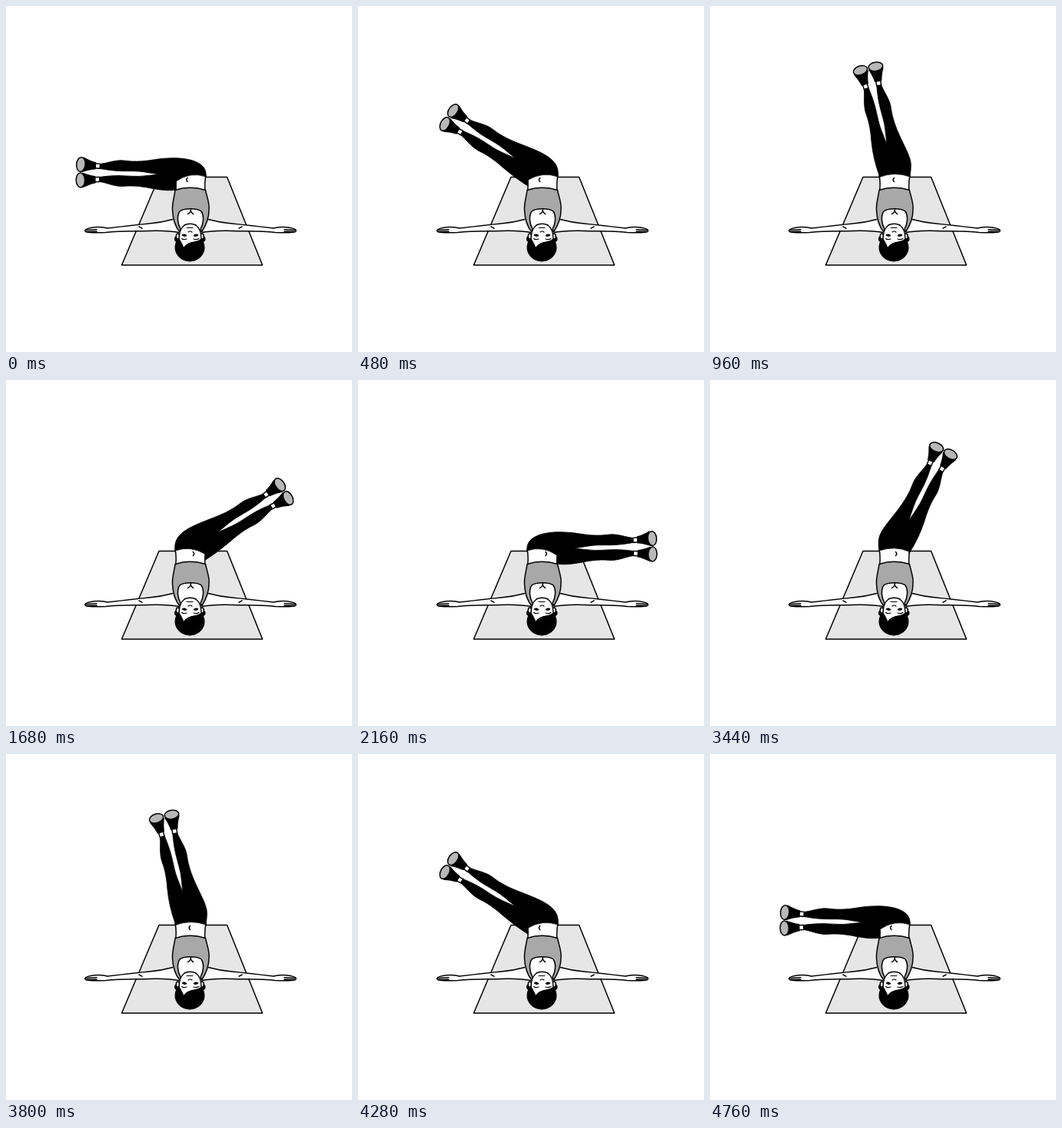
Write an HTML page that moves like this. It is 450 px wide and 450 px high and loops after 5200 ms.

```html
<!DOCTYPE html>
<html lang="en">
<head>
<meta charset="utf-8">
<title>Lying leg swing</title>
<style>
  html, body { margin: 0; width: 100%; height: 100%; overflow: hidden; background: #fff; }
  svg { display: block; width: 100vw; height: 100vh; }
  .line { fill: none; stroke: #000; stroke-width: 1.5; stroke-linecap: round; stroke-linejoin: round; }
  .skin { fill: #fff; }
  .mat { fill: #e6e6e6; }
  .top { fill: #a8a8a8; }
  .sole { fill: #b8b8b8; }
  .ink { fill: #000; }
  .thin { stroke-width: 1.2; }
  .pants { stroke: #000; stroke-width: .8; stroke-linejoin: round; }
</style>
</head>
<body>
<svg viewBox="0 0 450 450">
  <defs>
    <g id="arm">
      <path class="line skin" d="M217 277.500C208 280 197 282 186 283C166 285 149 287 132 289C126 287 116 287 110 288.500C105 289.500 102 291 103 293C105 295.500 118 295 130 294.500C148 292.500 166 293 186 292.500C200 292 214 292.500 228 295V277Z"/>
      <path class="line" d="M173 287L177 289.200M104 291.400L118 290.800M104.500 293.400L118 293.200"/>
    </g>

    <!-- One leg from thigh to foot, pointing along x from the hip -->
    <g id="leg">
      <path class="pants" d="M30 0L50 -18.500C60 -16.700 68 -16 76 -16S88 -17.500 95 -16.500C104 -15.300 110 -12.500 118 -11.500V-5.500C108 -4 100 -3 90 -3S70 -4 60 -2.500L41 0Z"/>
      <g transform="translate(118 -8.500) rotate(-4)">
        <path class="line skin" d="M0 -3H7V3H0Z"/>
        <path class="line ink" d="M6 -4Q13 -5 22 -9V9Q13 5 6 4Z"/>
        <ellipse class="line sole" cx="25" rx="5.700" ry="9.400"/>
      </g>
    </g>
  </defs>

  <path class="line mat" d="M199 222.500H287.500L333.500 337H150.500Z"/>
  <path class="line skin" d="M220 220Q222 230 220.500 242H259Q258 230 260 220"/>
  <g id="lower">
    <g id="swing">
      <use href="#leg" transform="scale(1 -1)"/>
      <use href="#leg"/>
    </g>
    <path id="hips" class="pants"/>
    <path id="navel" class="line" d="M-.5 -2.500q2.500 2.500 0 5"/>
  </g>

  <use href="#arm"/>
  <use href="#arm" transform="translate(480) scale(-1 1)"/>

  <path class="skin" d="M217 277L224 262H256L263 277L254 296H226Z"/>
  <path class="line top" d="M220 239.500C232 235.500 247 235.500 259.500 239.500C261 248 265 256 264 265C264 277 259 287 254.500 294L253 290C257 283 258 273 254 267C249 262.500 231 262.500 226 267C222 273 223 283 227 290L226 294C221 288 217 279 216.500 265C216 256 219 248 220 239.500Z"/>
  <path class="line" d="M236.500 270.500Q240 269 240.500 264.500M240.500 267Q241 269 243.500 270.500"/>

  <ellipse cx="239" cy="314" rx="19.500" ry="18.500"/>
  <circle cx="223" cy="303" r="4"/>
  <circle cx="255.500" cy="303" r="4"/>
  <ellipse class="line skin" cx="223.500" cy="299.500" rx="2.200" ry="3.600"/>
  <ellipse class="line skin" cx="255" cy="299.500" rx="2.200" ry="3.600"/>
  <path class="line skin" d="M225 303C225 294 227 289 232 285C236 282.500 243 282.500 247 285C252 289 254 294 254 303C251 308 243 306 238 309C234 311 232 313 231 316C230 311 227 307 225 303Z"/>
  <path class="line thin" d="M235 288.500H243M237 294Q239.500 292 242 294M228.500 302.500Q231 304.500 235 303M244 303Q248 304.500 251 302.500"/>
  <path class="line ink" d="M229.500 298Q232 296.500 234.500 298.500Q232 300 229.500 298ZM244.500 298.500Q247 296.500 249.500 298Q247 300 244.500 298.500Z"/>
</svg>

<script>
const STEP = 120, LOOP = 5200, RETURN = 2720;
const LAST = 18, MIDDLE = 9;
const HIP = { x: 240, y: 220 };
const $ = id => document.getElementById(id);

// Degrees away from upright: fast through the top, slowing towards the floor.
function tilt(steps) {
  const t = steps / MIDDLE;
  return 88.5 * (1 - (1 - t) ** 1.36) + Math.sin(3 * Math.PI * t);
}

function draw(pose) {
  const angle = 90 - tilt(Math.abs(pose - MIDDLE));
  const cos = Math.cos(angle * Math.PI / 180);
  const sin = Math.sin(angle * Math.PI / 180);
  const fold = cos * cos;

  // A point given along the legs and across them, as stage coordinates.
  const at = (along, across) =>
    `${HIP.x + along * cos + across * sin} ${HIP.y - along * sin + across * cos}`;

  $('hips').setAttribute('d',
    `M220 222C217 200 ${at(12, -26)} ${at(50, -18.5)}L${at(41, 0)} ${at(50, 18.5)}` +
    `Q${at(28, 22)} 259 ${222 + 17 * fold}V${222 + 6 * fold}Q${HIP.x} 215 220 222Z`);
  $('swing').setAttribute('transform', `translate(${HIP.x} ${HIP.y}) rotate(${-angle})`);
  $('navel').setAttribute('transform', `translate(${HIP.x + 4.5 * cos} 226)`);
  $('lower').setAttribute('transform',
    pose < MIDDLE ? `translate(${2 * HIP.x}) scale(-1 1)` : '');
}

function poseAt(t) {
  if (t < RETURN) return Math.min(LAST, Math.floor(t / STEP));
  return Math.max(0, LAST - 1 - Math.floor((t - RETURN) / STEP));
}

const start = performance.now();
let shown = -1;

function tick() {
  const pose = poseAt((performance.now() - start) % LOOP);
  if (pose !== shown) draw(shown = pose);
  requestAnimationFrame(tick);
}
tick();
</script>
</body>
</html>
```
